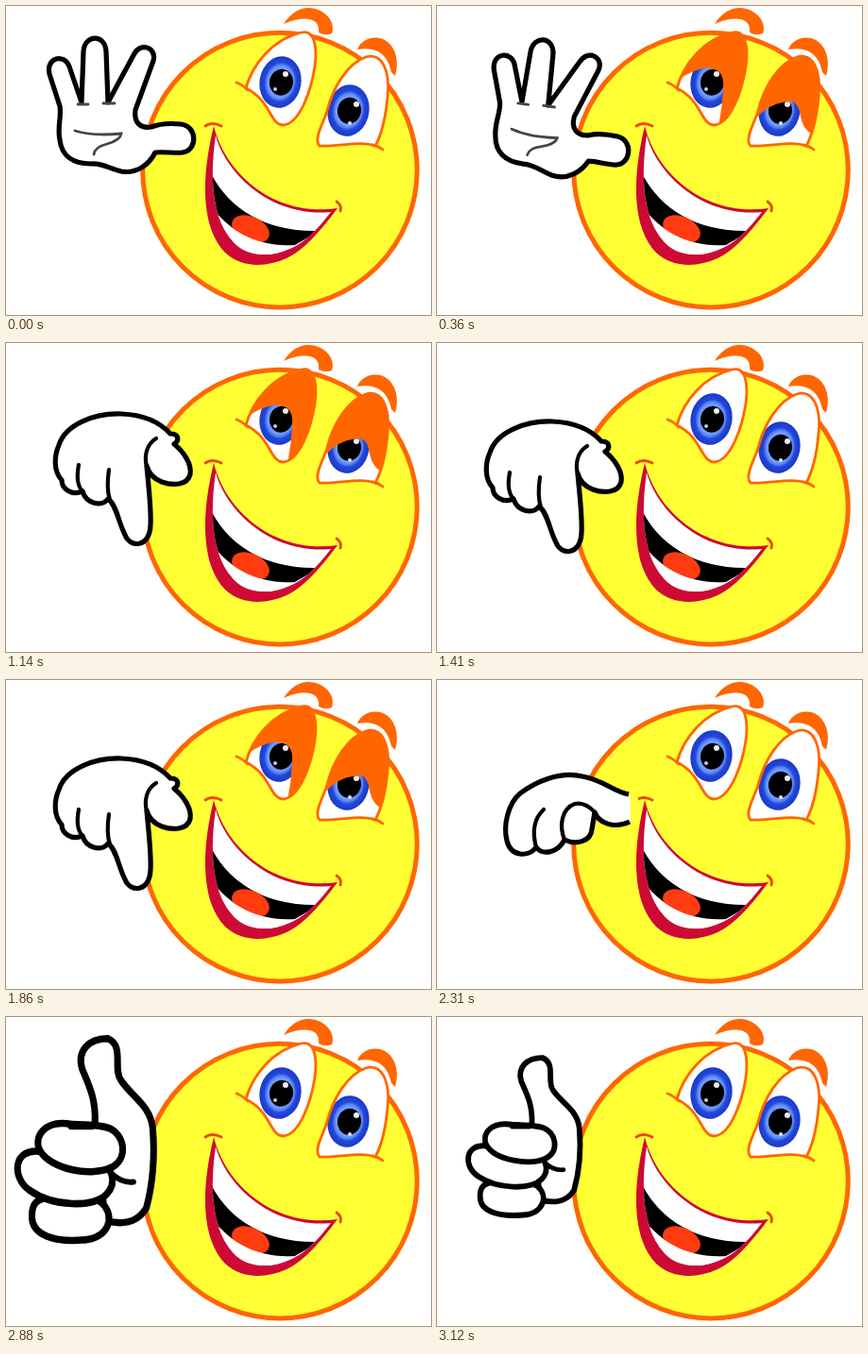
Animation, 450 px wide and 327 px high, one loop 3.24 s. Source, as an HTML page:

```html
<!DOCTYPE html>
<html lang="en">
<head>
<meta charset="utf-8">
<title>Waving smiley</title>
<style>
html, body { margin: 0; width: 100%; height: 100%; overflow: hidden; background: #fff; }
svg { display: block; width: 100vw; height: 100vh; }
.ink { fill: none; stroke: #000; stroke-width: 4.2; stroke-linecap: round; stroke-linejoin: round; }
.skin { fill: #fff; stroke: #000; stroke-width: 5.2; stroke-linejoin: round; }
.soft { fill: none; stroke: #444; stroke-width: 2.8; stroke-linecap: round; }
.rim { fill: none; stroke: #f60; stroke-width: 2.8; stroke-linecap: round; stroke-linejoin: round; }
.lid { fill: #f60; }
</style>
</head>
<body>
<svg viewBox="0 0 450 327" preserveAspectRatio="none">
  <defs>
    <radialGradient id="iris">
      <stop offset=".58" stop-color="#6f9bff"/>
      <stop offset=".67" stop-color="#5580f5"/>
      <stop offset=".76" stop-color="#2449d8"/>
      <stop offset="1" stop-color="#1a38cc"/>
    </radialGradient>
    <path id="eyeL" d="M254 87C261 62 282 35 313 28C326 25 330 42 327 64C323 90 311 124 294 126C279 126 281 100 254 87Z"/>
    <path id="eyeR" d="M332 148C325 141 337 122 340 111C346 87 361 61 381 54C398 49 407 68 404 96C402 118 397 137 391 148C376 142 352 149 332 148Z"/>
    <clipPath id="clipL"><use href="#eyeL"/></clipPath>
    <clipPath id="clipR"><use href="#eyeR"/></clipPath>
    <g id="ball">
      <ellipse rx="22" ry="27.5" fill="url(#iris)"/>
      <ellipse cx="1" cy="0" rx="12.5" ry="14" fill="#000"/>
    </g>
    <path id="inside" d="M222 137C233 178 281 224 344 218C328 239 314 252 300 257C281 266 256 266 241 250C219 226 215 186 222 137Z"/>
    <clipPath id="lips"><use href="#inside"/></clipPath>
  </defs>

  <circle cx="290" cy="173.6" r="145.3" fill="#ff3" stroke="#f60" stroke-width="5"/>

  <g fill="#f60">
    <path d="M294 19C304 3 319-2 333 5C344 11 348 21 345 29Q338 32 331 28C333 13 317 9 294 19Z"/>
    <path d="M372 46C377 33 394 30 404 38C414 46 416 61 412 74L408 70C405 55 396 42 372 46Z"/>
  </g>

  <g>
    <use href="#eyeL" fill="#fff"/>
    <g clip-path="url(#clipL)">
      <use href="#ball" transform="translate(290.5 80.5) rotate(10)"/>
      <circle cx="296" cy="72" r="3" fill="#eee"/>
      <circle cx="285" cy="88" r="2" fill="#bcd"/>
      <path class="lid half" d="M240 90Q270 64 290 66Q305 68 303 88Q302 108 298 128L340 128V20H240Z"/>
    </g>
    <use href="#eyeL" class="lid shut"/>
    <use href="#eyeL" class="rim"/>
    <path class="rim" d="M244 81Q250 83 256 89"/>

    <use href="#eyeR" fill="#fff"/>
    <g clip-path="url(#clipR)">
      <use href="#ball" transform="translate(362.5 110.5) rotate(10)"/>
      <circle cx="371" cy="104" r="3" fill="#eee"/>
      <circle cx="364" cy="124" r="2" fill="#dde"/>
      <path class="lid half" d="M320 125Q338 120 346 111Q359 101 376 101Q383 103 385 117Q388 132 398 136L420 136V40H320Z"/>
    </g>
    <use href="#eyeR" class="lid shut"/>
    <use href="#eyeR" class="rim"/>
    <path class="rim" d="M388 147Q394 148 399 152"/>
  </g>

  <path d="M220 127C231 174 281 224 351 214C331 241 313 260 297 267C275 277 249 277 232 261C207 235 206 184 220 127Z" fill="#cc0a35"/>
  <use href="#inside" fill="#fff"/>
  <g clip-path="url(#lips)">
    <path d="M212 166C229 210 270 240 332 238L304 254C276 259 240 244 214 208Z"/>
    <ellipse cx="259" cy="236" rx="21" ry="13" fill="#ff3b10" transform="rotate(24 259 236)"/>
    <path d="M214 208C232 236 265 256 306 253L286 280H210Z" fill="#fff"/>
  </g>
  <path class="rim" style="stroke:#e8480c" d="M211 127Q218 122 228 127M350 207Q356 211 354 217"/>

  <g id="open">
    <path class="skin" d="M46 72C42 54 62 50 67 64L80 102L82 48C83 30 105 29 106 48L108 102L135 52C142 37 160 44 156 58L137 110C135 124 143 130 154 128C164 124 175 124 185 125C203 127 203 153 187 155C178 156 168 154 158 155C152 167 139 178 122 175C109 172 102 166 90 167C70 167 59 158 57 142C54 127 59 118 57 106Z"/>
    <path class="soft" d="M76 104H87M103 103H115M73 132Q92 138 122 135Q121 142 107 146Q94 149 93 157"/>
  </g>

  <g id="point">
    <path class="skin" d="M108 165C101 174 85 170 81 157C69 162 59 154 59 145C50 136 51 119 56 108C63 86 94 74 122 75C148 76 164 85 174 96C183 96 184 103 178 107C188 115 197 128 195 139C192 151 176 151 165 147C157 144 151 138 149 130C151 153 154 176 153 193C152 217 131 217 126 203C119 190 117 171 108 165Z"/>
    <path class="ink" d="M77 129Q73 150 82 158M109 134Q106 154 110 166M159 101C149 107 146 119 149 131"/>
  </g>

  <g id="fist">
    <path d="M188 117L205 121V150L190 155Z" fill="#fff"/>
    <path d="M204 118H213V157H206Z" fill="#ff3"/>
    <path class="skin" d="M203 121C186 118 177 106 154 102C130 96 104 108 88 120C75 131 70 154 74 170C78 187 97 188 105 177C112 186 128 183 135 169C147 175 163 171 164 158L167 140C171 151 187 158 204 150"/>
    <path class="ink" d="M105 177Q98 151 113 137M135 169C129 154 132 136 146 131Q157 129 167 140"/>
  </g>

  <g id="thumb">
    <path class="skin" d="M106 120C107 103 102 93 96 80C92 67 101 58 116 58C129 63 120 80 126 88C134 100 149 106 151 123C153 146 150 167 146 181C138 193 126 193 114 190Z"/>
    <path class="skin" d="M60 177C68 170 102 171 111 177C123 187 116 203 98 204C75 206 56 201 57 186Q57 180 60 177Z"/>
    <path class="skin" d="M64 140C42 137 41 159 55 168C73 180 105 181 115 171C124 162 119 150 108 147Z"/>
    <path class="skin" d="M87 120C67 117 58 129 63 139C71 153 104 159 120 151C132 144 129 128 117 123C108 120 100 121 87 120Z"/>
    <path class="ink" d="M87 122H104M119 156Q127 163 136 162"/>
  </g>
</svg>
<script>
const LOOP = 3240;
const hands = ["open", "point", "fist", "thumb"].map(id => document.getElementById(id));
const halves = document.querySelectorAll(".half");
const shuts = document.querySelectorAll(".shut");

const rest = "";
const swingLeft = "rotate(-42 175 150)";
const swingRight = "translate(1.5 .8) rotate(7.6 95 165)";
const jab = "translate(0 63)";
const low = "translate(0 8)";
const mid = "matrix(1.118 0 0 1.14 -18.1 -23)";
const big = "matrix(1.36 0 0 1.46 -50 -62)";

// start time, hand, placement
const poses = [
  [0, "open", rest], [60, "open", swingLeft], [120, "open", rest], [180, "open", swingRight],
  [540, "open", swingLeft], [570, "open", swingRight],
  [600, "point", low], [660, "point", jab], [720, "point", rest],
  [1350, "point", jab], [1410, "point", low],
  [2220, "point", jab], [2250, "point", rest],
  [2310, "fist", rest], [2370, "fist", "translate(0 -8)"],
  [2400, "thumb", big], [2460, "thumb", mid], [2520, "thumb", rest],
  [2820, "thumb", mid], [2880, "thumb", big], [2940, "thumb", rest],
  [3000, "thumb", mid], [3060, "thumb", big], [3120, "thumb", mid]
];

const show = (el, on) => { el.style.display = on ? "" : "none"; };

function draw(t) {
  const [, name, place] = poses.findLast(p => p[0] <= t);
  for (const hand of hands) {
    show(hand, hand.id === name);
    hand.setAttribute("transform", place);
  }
  // a blink every 780 ms: half, shut, half
  const blink = (t + 480) % 780;
  halves.forEach(el => show(el, blink < 90));
  shuts.forEach(el => show(el, blink >= 30 && blink < 60));
}

const start = performance.now();
function tick() {
  draw((performance.now() - start) % LOOP);
  requestAnimationFrame(tick);
}
tick();
</script>
</body>
</html>
```
